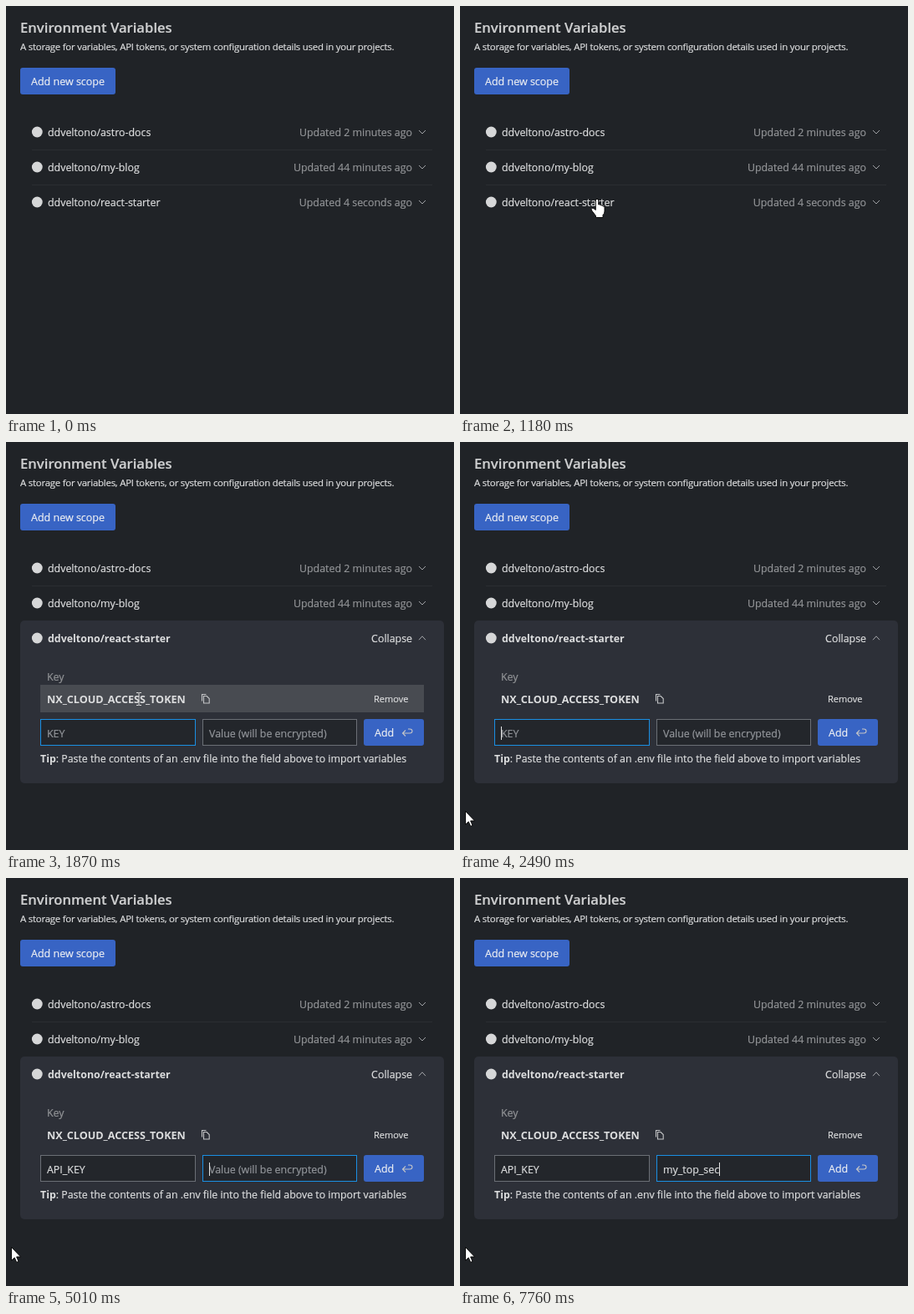
Recreate the animation shown at these times as an HTML page. Size 536 by 489 pixels, loop 7.99 s.

```html
<!DOCTYPE html>
<html lang="en">
<head>
<meta charset="utf-8">
<title>Environment Variables</title>
<style>
  html, body { margin: 0; width: 100%; height: 100%; overflow: hidden; background: #202327; }
  svg { display: block; width: 100%; height: 100%; }
  text {
    font: 12.4px "Open Sans", "Noto Sans", sans-serif; white-space: pre;
    color: #dcddde; fill: currentColor; stroke: currentColor; stroke-width: .2;
  }
  .h1 { font-size: 16.65px; font-weight: 600; color: #cfd0d1; }
  .sub { font-size: 11.4px; letter-spacing: -.215px; }
  .dim { color: #929497; }
  .hint { color: #93969b; }
  .bold { font-weight: 700; stroke: none; }
  .small { font-size: 11px; }
  .label { font-size: 12.5px; color: #eceef2; }
  .end { text-anchor: end; }
  .line { fill: none; stroke: #c4c5c7; stroke-width: 1.1; }
  .chev { fill: none; stroke: #a9abae; stroke-width: .95; }
  .sep { stroke: #2b2e32; }
  .btn { fill: #3864c4; }
  .field { fill: #23262b; stroke: #6b6f76; }
  .field.on { stroke: #1a8fe3; }
  .cur { fill: #fff; stroke: #000; stroke-width: .9; stroke-linejoin: round; }
</style>
</head>
<body>
<svg id="stage" viewBox="0 0 536 489" preserveAspectRatio="none"></svg>
<script>
const LOOP = 7990, OPEN = 1280, FOCUS = 1310, TAB = 5010, BLINK = 530;
const USER = "ddveltono";
const stage = document.getElementById("stage");

// Typed characters and the time each one lands
const keyTyping = { text: "API_KEY", at: [3230, 3430, 3560, 3790, 4000, 4200, 4400] };
const valueTyping = { text: "my_top_sec", at: [5790, 6040, 6420, 6650, 6750, 6850, 7150, 7430, 7660, 7760] };

// Pointer path: time, x, y
const path = [
  [460, 299, 484], [580, 276, 438], [700, 236, 374], [800, 202, 322], [900, 179, 279],
  [1020, 164, 231], [1510, 164, 231], [1570, 170, 239], [1720, 170, 240],
  [1800, 164, 280], [1870, 159, 308], [2000, 146, 350], [2200, 92, 412], [2350, 38, 434], [2490, 6, 442]
];

const text = (x, y, str, cls = "", id = "") =>
  `<text x="${x}" y="${y}" class="${cls}"${id && ` id="${id}"`}>${str}</text>`;
const rect = (x, y, w, h, attrs) => `<rect x="${x}" y="${y}" width="${w}" height="${h}" ${attrs}/>`;
const chevron = (y, d) => `<path class="chev" d="M494 ${y - d}l4 ${2 * d}l4 ${-2 * d}"/>`;
const badge = y => `<circle cx="37.3" cy="${y}" r="6.4" fill="#d6d7d8"/>`;
const row = (y, name, age) =>
  badge(y) + text(50, y + 5, `${USER}/${name}`) +
  text(486, y + 5, `Updated ${age} ago`, "dim end") + chevron(y, 2);
const sep = y => `<path class="sep" d="M31 ${y}H510"/>`;

const openPanel =
  rect(17, 214, 507, 195, 'rx="5" fill="#2d3038"') +
  badge(235) + text(50, 240, `${USER}/react-starter`, "bold") +
  text(486, 240, "Collapse", "end") + chevron(235, -2.2) +
  text(49, 286, "Key", "dim") +
  rect(41, 291, 459, 33, 'id="hover" fill="#484b51"') +
  `<text x="49" y="313" class="bold" style="font-size:12.6px">NX_CLOUD_ACCESS_TOKEN</text>` +
  `<path class="line" d="M236.5 304.5h3.7l3 3v5.5h-6.7zM234.5 310.5v-8h5"/>` +
  text(440, 312, "Remove", "small") +
  rect(41.5, 332.5, 185, 31, 'id="keyBox" class="field"') +
  rect(235.5, 332.5, 184, 31, 'id="valueBox" class="field"') +
  text(49, 354, "KEY", "", "keyText") +
  text(243, 354, "Value (will be encrypted)", "", "valueText") +
  rect(49, 341, 1, 16, 'id="caret" fill="#e4e4e4"') +
  rect(428, 332, 72, 32, 'rx="3" class="btn"') + text(441, 353, "Add", "label") +
  `<path class="line" d="M478 345.5l-3.5 3.5l3.5 3.5M474.5 349h8.5q3 0 3-2.5t-3-2.5h-2"/>` +
  `<text x="41" y="384" style="font-size:12.35px"><tspan class="bold">Tip</tspan>: Paste the contents of an .env file into the field above to import variables</text>`;

const pointers =
  `<path id="arrow" class="cur" d="M.5 .5V16.5L4.2 13L6.7 18.5L9 17.5L6.6 12H11.5Z"/>` +
  `<path id="hand" class="cur" d="M-1.7 2Q-1.7 .4 0 .4T1.7 2V7Q4 6.2 4.5 8Q6.5 7.3 7 9Q9 8.6 9 10.5V15Q9 18 7 19.5V22.5H-1.5V20.5L-6.5 14Q-7.5 12 -5.8 11.3Q-4.3 11 -1.7 13.5Z"/>` +
  `<path id="beam" fill="none" stroke="#dcdcdc" d="M-3 -7.5h2.5l.5 .5l.5 -.5h2.5M-3 7.5h2.5l.5 -.5l.5 .5h2.5M0 -7V7"/>`;

stage.innerHTML =
  text(17, 32, "Environment Variables", "h1") +
  text(17, 53, "A storage for variables, API tokens, or system configuration details used in your projects.", "sub") +
  rect(17, 74, 114, 32, 'rx="3" class="btn"') + text(30, 95, "Add new scope", "label") +
  row(151, "astro-docs", "2 minutes") + sep(172.5) +
  row(193, "my-blog", "44 minutes") + sep(214.5) +
  `<g id="closed">${row(235, "react-starter", "4 seconds")}</g>` +
  `<g id="open">${openPanel}</g>` +
  `<g id="pointer">${pointers}</g>`;

const el = {};
stage.querySelectorAll("[id]").forEach(n => el[n.id] = n);
const show = (node, on) => node.style.display = on ? "" : "none";

function pointAt(t) {
  let i = path.findIndex(p => p[0] > t);
  if (i < 0) i = path.length;
  const a = path[i - 1], b = path[i];
  if (!a) return null;
  if (!b) return [a[1], a[2]];
  const k = (t - a[0]) / (b[0] - a[0]);
  return [1, 2].map(j => Math.round(a[j] + (b[j] - a[j]) * k));
}

function pointerKind(x, y, open) {
  const within = (x0, y0, x1, y1) => x >= x0 && x < x1 && y >= y0 && y < y1;
  if (within(17, 215, 524, 257)) return "hand";
  if (open && (within(49, 299, 217, 318) || within(41, 332, 227, 364) || within(41, 372, 480, 389))) return "beam";
  return "arrow";
}

function fill(node, typing, hint, t) {
  const n = typing.at.filter(a => a <= t).length;
  const str = n ? typing.text.slice(0, n) : hint;
  if (node.textContent !== str) node.textContent = str;
  node.classList.toggle("hint", !n);
  return n;
}

function draw(t) {
  const open = t >= OPEN, inValue = t >= TAB;
  show(el.closed, !open);
  show(el.open, open);

  const p = pointAt(t);
  show(el.pointer, p);
  if (p) {
    const kind = pointerKind(p[0], p[1], open);
    for (const k of ["arrow", "hand", "beam"]) show(el[k], k === kind);
    el.pointer.setAttribute("transform", `translate(${p})`);
  }
  show(el.hover, p && p[1] >= 291 && p[1] < 324);
  if (!open) return;

  const nKey = fill(el.keyText, keyTyping, "KEY", t);
  const nValue = fill(el.valueText, valueTyping, "Value (will be encrypted)", t);
  el.keyBox.classList.toggle("on", t >= FOCUS && !inValue);
  el.valueBox.classList.toggle("on", inValue);

  // The caret restarts its blink on focus and on every key
  const typing = inValue ? valueTyping : keyTyping;
  const n = inValue ? nValue : nKey;
  const since = n ? typing.at[n - 1] : inValue ? TAB : 1200;
  const node = inValue ? el.valueText : el.keyText;
  const x = (inValue ? 243 : 49) + (n ? node.getComputedTextLength() : 0);
  el.caret.setAttribute("x", Math.round(x));
  show(el.caret, t >= FOCUS && Math.floor((t - since) / BLINK) % 2 === 0);
}

const start = performance.now();
function tick() {
  draw((performance.now() - start) % LOOP);
  requestAnimationFrame(tick);
}
tick();
</script>
</body>
</html>
```
